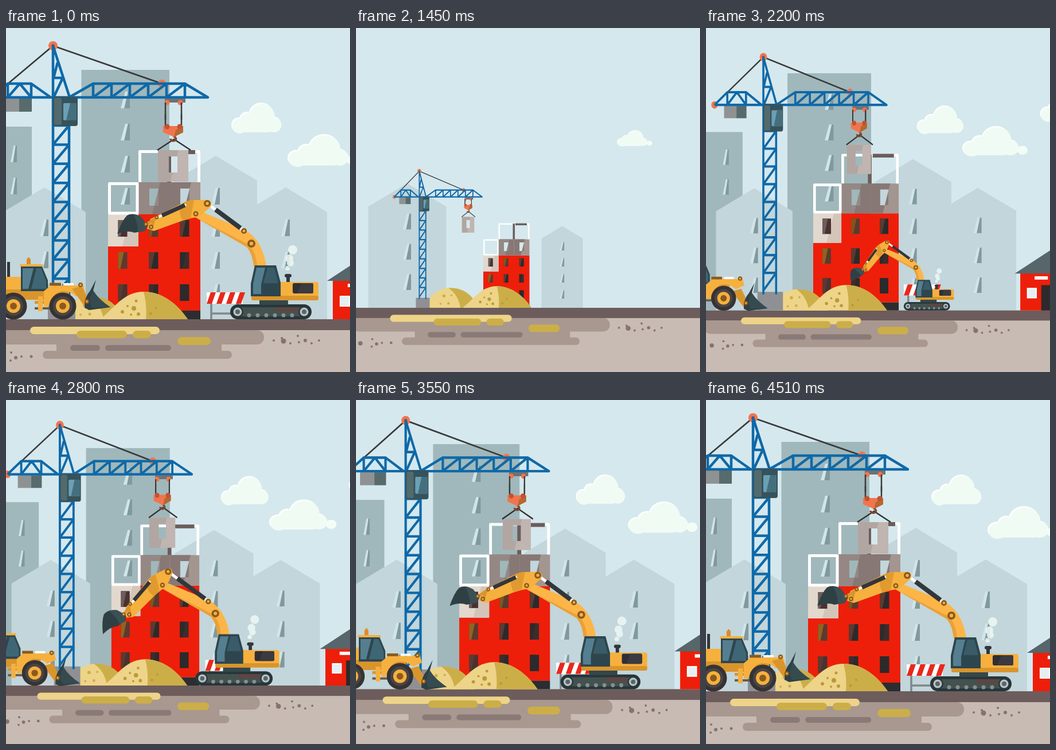
Recreate the animation shown at these times as an HTML page. Size 600 by 600 pixels, loop 4540 ms.

```html
<!DOCTYPE html>
<html lang="en">
<head>
<meta charset="utf-8">
<title>Construction site</title>
<style>
html, body { margin: 0; width: 100%; height: 100%; overflow: hidden; background: #d5e8ee; }
svg { display: block; width: 600px; height: 600px; }
</style>
</head>
<body>
<svg id="stage" viewBox="0 0 600 600"></svg>
<script>
const LOOP = 4540, HOLD = 1000, END = 4510, GROUND = 508;
const INK = '#2e4044', YELLOW = '#f6b03e', AMBER = '#d9952c', BROWN = '#8a5a1e',
  ORANGE = '#f0754f', STEEL = '#0f69a8', RED = '#ed1f0a', SAND = '#edd488', SAND2 = '#ccae49';

// Markup helpers
const rect = (x, y, w, h, fill, r = 0) => `<rect x="${x}" y="${y}" width="${w}" height="${h}" rx="${r}" fill="${fill}"/>`;
const disc = (x, y, r, fill) => `<circle cx="${x}" cy="${y}" r="${r}" fill="${fill}"/>`;
const shape = (d, fill) => `<path d="${d}" fill="${fill}" fill-rule="evenodd"/>`;
const line = (d, color, w) => `<path d="${d}" fill="none" stroke="${color}" stroke-width="${w}" stroke-linejoin="round"/>`;
const group = (id, body) => `<g id="${id}">${body}</g>`;
const pop = (start, x, y, body) => `<g data-pop="${start},${x},${y}">${body}</g>`;
const range = (n, f) => Array.from({ length: n }, (_, i) => f(i)).join('');
const dots = (list, fill) => list.map(([x, y, r]) => disc(x, y, r, fill)).join('');
const joint = (x, y, r) => disc(x, y, r, BROWN) + disc(x, y, r * .45, YELLOW);

// Distant buildings
function pane(x, y, w = 15) {
  return shape(`M${x} ${y + 29}L${x + w * .5} ${y}H${x + w * .8}L${x + w * .4} ${y + 29}Z`, '#d0e4e9') +
    shape(`M${x + w * .8} ${y}H${x + w}V${y + 29}H${x + w * .4}Z`, '#81999d');
}
const panes = (x, y, n, w) => range(n, i => pane(x, y + 56 * i, w));
function gable(start, x, top, n) {
  return pop(start, x, GROUND, shape(`M${x - 72} ${GROUND}V${top + 43}L${x} ${top}L${x + 72} ${top + 43}V${GROUND}Z`, '#c2d6db') +
    panes(x - 8, top + 56, n));
}

// Clouds
function cloud(id, start, x, y, sx, sy, puff) {
  const lobes = (dx, dy, fill) => disc(13 + dx, 39 + dy, 13, fill) + disc(27 + dx, 29 + dy, 13, fill) +
    disc(52 + dx, 22 + dy, 22, fill) + disc(73 + dx, 37 + dy, 13, fill) + rect(13 + dx, 28 + dy, 60, 24 - dy, fill, 10);
  const body = lobes(0, 0, '#fff') + lobes(1.5, 2, '#f0fbf4') + (puff ? disc(93, 43, 8, '#f3fdf6') : '');
  return group(id, pop(start, x + 43 * sx, y + 26 * sy, `<g transform="translate(${x} ${y}) scale(${sx} ${sy})">${body}</g>`));
}

// Red block under construction
function glass(x, y, left, right) {
  return rect(x, y, 16, 29, right) + shape(`M${x} ${y}h10l-6 29h-4Z`, left);
}
function hollow(x, y, left, right) {
  const hole = `M${x + 19} ${y + 11}v30h16v-30Z`;
  return shape(`M${x} ${y}h54v56h-54Z` + hole, right) + shape(`M${x} ${y}h38l-14 56h-24Z` + hole, left);
}
function block() {
  const tones = [['#6b5d5a', '#4a3230'], ['#80561c', '#5b3a30'], ['#5b3a30', '#2c2a2c'],
    ['#8f6420', '#5b3a30'], ['#5b3a30', '#2c2a2c'], ['#2c2a2c', '#3b2d2c'],
    ['#5b3a30', '#4a3230'], ['#3b2d2c', '#2c2a2c'], ['#2c2a2c', '#2c2a2c']];
  return shape('M178 381H231V325H339V493H178Z', RED) + rect(178, 493, 161, 15, '#2b2d30') +
    rect(178, 325, 53, 56, '#e2d8ce') + shape('M217 325h14v56h-28Z', '#d3c5ba') +
    tones.map(([a, b], i) => glass(195.5 + 54 * (i % 3), 335 + 56 * (i / 3 | 0), a, b)).join('') +
    hollow(231, 269, '#958884', '#877875') + hollow(285, 269, '#877875', '#a3958f') +
    line('M180.500 323V271.500H229V323Z', '#fff', 5) +
    line('M233.500 269V215.500H336.500V269', '#fff', 5) +
    rect(281, 214, 7, 55, '#6b5d5a') + rect(290, 213, 40, 7, '#6b5d5a');
}

// Tower crane
function crane() {
  const mast = line(`M82 121V478M110 121V478` + range(9, i => `M82 ${170 + 33.4 * i}H110L82 ${203.4 + 33.4 * i}`), STEEL, 4.500);
  const jib = line('M-25 121H352L312 97H152L110 121M-25 121L3 97H44L78 121M3 97V121L24 97L44 121V97' +
    range(6, i => `M${152 + 32 * i} 97V121` + (i < 5 ? `L${184 + 32 * i} 97` : '')), STEEL, 4.500);
  const head = line('M82 121V31L111 121M83 87H99L84 119M83 87L90 60', STEEL, 4.500);
  const load = shape('M265 213h53v55h-53ZM284 224v28h15v-28Z', '#c0b5b0') +
    shape('M265 213h36l-3 11h-14v28h7l-4 16h-22Z', '#b1a6a2') +
    line('M264 213L293 194L322 213', '#333', 2.500) +
    line('M293 183v6q7 5 0 8q-6 0-6-4', '#7a4630', 3.500) +
    shape('M274 171H309V182L293 190L274 182Z', ORANGE) + shape('M293 190L309 182V171L296 178Z', '#b5682f') +
    disc(281, 172, 4.500, '#c4522f') + disc(303, 172, 4.500, '#c4522f');
  return rect(73, 473, 48, 35, '#8f9094') + group('crane', mast +
    rect(-4, 123, 27, 23, '#8e9293') + rect(23, 123, 22, 23, '#586b6c') +
    line('M-25 121L82 31L272 97', '#3a3a3a', 2.800) +
    disc(82, 31, 8, ORANGE) + disc(82, 31, 3, '#c4522f') + disc(-25, 121, 7, ORANGE) + disc(272, 97, 7, ORANGE) + head + jib +
    rect(82, 120, 43, 51, '#36525a', 4) + rect(84, 122, 13, 47, '#526a6c', 3) +
    rect(100, 131, 23, 30, '#6ba0b5', 2) + shape('M112 131h11v30h-18Z', '#456f7d') +
    rect(277, 123, 36, 7, '#6d7275') + disc(281, 130, 4.500, ORANGE) + disc(304, 130, 4.500, ORANGE) +
    line('M278 130V160M306 130V160', '#3a3a3a', 2.500) +
    group('load', line('M278 150V174M306 150V174', '#3a3a3a', 2.500) + load));
}

// Sand, barrier and shed
const smallPile = shape('M98 508Q114 468 150 468Q188 470 206 508Z', SAND) +
  shape('M146 468Q188 466 206 508H170Q166 482 146 468Z', SAND2) + dots([[137, 484, 3], [146, 499, 2.500], [130, 500, 2], [152, 483, 2]], SAND2);
const bigPile = shape('M164 508C190 488 205 460 240 460C276 460 302 486 317 508Z', SAND) +
  shape('M240 460C276 460 302 486 317 508H244Q246 482 240 460Z', SAND2) +
  dots([[203, 495, 3], [212, 485, 2], [223, 489, 4], [231, 499, 3], [218, 500, 2], [227, 476, 2.500], [252, 498, 2.500], [262, 488, 2]], '#b99a3a');
const barrier = line('M358 480V508M404 480V508M358 498H404', '#7d898c', 3.500) + rect(350, 461, 63, 20, '#fff') +
  range(4, i => shape(`M${350 + 17 * i} 481l7-20h9l-7 20Z`, '#e8281c'));
const shed = rect(570, 438, 108, 70, RED) + shape('M560 441L624 399L688 441Z', '#56666a') +
  rect(596, 446, 24, 6, '#fff') + rect(582, 467, 18, 19, '#fff') + rect(584, 469, 14, 15, '#e6eff2') + rect(608, 462, 24, 46, '#2c2a2c');

// Excavator
function digger() {
  const bucket = shape('M247 345L236 330Q222 321 211 327Q202 336 194 359Q212 352 224 357L242 354Z', INK) +
    shape('M236 330L247 345L242 354L230 356Q230 340 222 325Z', '#3a5054');
  const stick = shape('M352 300L326 300Q315 301 305 307L252 333L246 350L258 354L308 336Q326 330 336 330L357 312Q361 302 352 300Z', YELLOW) +
    shape('M305 307Q315 301 328 300L322 331L308 336Q300 322 305 307Z', '#e09a30') +
    line('M314 308L263 331', '#fff', 4) + line('M312 309L272 327', '#33363a', 7) +
    line('M263 331L244 343M258 336L254 347', AMBER, 5) +
    joint(263, 330, 3.500) + joint(253, 347, 4) + joint(244, 342, 3.500) + joint(351, 306, 6);
  const boom = shape('M330 318L345 322L410 349Q432 358 444 382Q452 398 454 416H432Q430 394 420 382L330 330Z', '#fdb548') +
    shape('M330 330L420 382Q430 394 432 416H438Q436 390 424 378Z', '#e9a139');
  const tracks = rect(391, 482, 142, 26, '#26363a', 13) + rect(397, 487, 130, 16, '#43524f', 8) + rect(470, 487, 40, 7, '#5f4540') +
    [404, 520].map(x => disc(x, 495, 10, '#2a3639') + disc(x, 495, 7.500, '#b9c2c3') + disc(x, 495, 4, '#56666a')).join('') +
    range(6, i => disc(424 + 15 * i, 501, 3.500, '#87908f'));
  const body = rect(442, 474, 50, 9, '#34474b') + rect(428, 443, 117, 32, YELLOW, 4) + rect(428, 467, 117, 8, AMBER, 3) +
    rect(500, 445, 36, 18, '#2f2f35', 3) + shape('M515 445h18q3 0 3 3v12q0 3-3 3h-25Z', '#3b3a40') +
    rect(489, 432, 6, 11, '#33363a') + rect(486, 429, 12, 6, '#33363a', 3) +
    shape('M434 414H471L479 444V468H427V446Z', '#2d464e') + shape('M437 418H452L445 448V464H431V446Z', '#557f90') +
    shape('M456 418H468L475 445H449Z', '#3a5c69');
  const smoke = '<g opacity=".85">' + dots([[500, 387, 8], [494, 402, 7], [496, 410, 6], [491, 419, 4]], '#eef9f5') + '</g>';
  return group('digger', pop(2085, 462, GROUND, smoke + boom + tracks + body +
    `<line id="rod" stroke="#fff" stroke-width="5"/><line id="ram" stroke="#33363a" stroke-width="8"/>` +
    joint(415, 354, 5) + joint(428, 376, 7) + group('stick', bucket + stick) + joint(331, 324, 4.500)));
}

// Wheel loader
function loader() {
  const wheel = x => disc(x, 485, 23.500, '#363334') + disc(x, 485, 17, '#4a4545') + disc(x, 485, 12, YELLOW) + disc(x, 485, 6, BROWN);
  const scoop = shape('M115 455L132 450L145 476L136 484Z', AMBER) +
    shape('M157 439L152 458Q162 474 182 487L145 492L137 488Q136 470 147 458Z', INK) +
    shape('M152 458Q162 474 182 487L150 488Q142 474 152 458Z', '#364b4f') + joint(141, 477, 4);
  return group('loader', pop(1610, 50, GROUND, rect(2, 408, 5, 28, '#33363a') + rect(-40, 434, 72, 34, YELLOW, 5) + rect(-40, 456, 150, 18, AMBER) +
    rect(36, 402, 7, 12, '#e08a26', 2) + rect(38, 400, 3, 4, '#e08a26') +
    rect(24, 412, 41, 5, YELLOW, 2) + shape('M26 416H63L73 440V459H26Z', '#2d464e') +
    shape('M29 419H48L39 455H29Z', '#557f90') + shape('M53 419H61L70 441V455H44Z', '#3f6675') +
    rect(50, 476, 28, 5, AMBER) + rect(50, 487, 28, 4, '#6b5a4a') + rect(56, 468, 8, 26, YELLOW) +
    shape('M66 459L78 449H124L134 446L138 461L122 468Q112 458 97 459Q80 462 74 486H66Z', YELLOW) +
    line('M76 447H96', BROWN, 5) + line('M100 447H118', '#fff', 4) +
    group('scoop', scoop) + joint(130, 448, 4) + wheel(13) + wheel(99)));
}

// Road surface
function road() {
  const taupe = '#a8988f', dark = '#8a7a77';
  return rect(-28, 527, 478, 25, taupe, 12) + rect(-28, 527, 460, 14, taupe) + rect(88, 545, 288, 24, taupe) + rect(64, 563, 330, 14, taupe, 7) +
    rect(112, 553, 52, 10, dark, 5) + rect(173, 553, 115, 10, dark, 5) +
    rect(42, 521, 226, 13, SAND, 6.500) + rect(123, 528, 88, 13, SAND2, 6.500) + rect(221, 528, 32, 13, SAND2, 6.500) + rect(299, 539, 58, 14, SAND2, 7) +
    dots([[467, 545, 2], [484, 546, 4.500], [481, 541, 2], [496, 550, 2], [509, 537, 2], [511, 548, 2], [522, 545, 3], [533, 550, 2], [546, 545, 2],
      [-26, 571, 2], [-13, 574, 4], [9, 566, 2], [17, 575, 3], [8, 580, 2], [27, 573, 2], [44, 573, 2.500]], '#84736f');
}

document.getElementById('stage').innerHTML = rect(0, 0, 600, 600, '#d5e8ee') + group('camera',
  pop(1546, -42, GROUND, rect(-130, 172, 175, 336, '#a0b8bb') + panes(8, 205, 4, 11)) +
  pop(1720, 208, GROUND, rect(131.5, 73, 153.5, 435, '#a0b8bb') + panes(200, 111, 5, 16)) +
  gable(1050, 67, 278, 3) + gable(1350, 366, 223, 4) + gable(1640, 488, 278, 3) +
  cloud('cloudA', 1645, 393, 130, 1, 1) + cloud('cloudB', 1350, 491, 185, 1.22, 1.06, true) + cloud('cloudC', 1760, 630, 114, 1, 1) +
  rect(-60, GROUND, 720, 160, '#c8bbb3') + pop(1030, 300, GROUND, rect(-80, GROUND, 760, 19, '#6d5c5c')) +
  pop(1100, 250, GROUND, road()) +
  pop(1350, 258, GROUND, block()) + pop(1200, 158, GROUND, smallPile) + pop(1350, 97, GROUND, crane()) +
  pop(1250, 240, GROUND, bigPile) +
  pop(1800, 381, GROUND, barrier) + pop(1760, 624, GROUND, shed) + digger() + loader());

const el = Object.fromEntries([...document.querySelectorAll('[id]')].map(e => [e.id, e]));
const pops = [...document.querySelectorAll('[data-pop]')].map(e => [e, ...e.dataset.pop.split(',').map(Number)]);
const set = (e, value) => e.setAttribute('transform', value);
const clamp = v => Math.min(1, Math.max(0, v));
const sine = v => (1 - Math.cos(Math.PI * clamp(v))) / 2;
const backOut = p => p <= 0 ? 0 : 1 + 2.1 * (p - 1) ** 3 + 1.1 * (p - 1) ** 2;
const scaleAt = (x, y, sx, sy = sx) => `translate(${x} ${y}) scale(${sx} ${sy}) translate(${-x} ${-y})`;
function placeLine(e, x1, y1, x2, y2) {
  Object.entries({ x1, y1, x2, y2 }).forEach(([k, v]) => e.setAttribute(k, v));
}

function draw(t) {
  const left = (END - t) / 1000;
  set(el.camera, scaleAt(300, 300, .9 + .1 * sine((t - HOLD) / (END - HOLD))));
  for (const [e, start, x, y] of pops) set(e, scaleAt(x, y, backOut(clamp((t - start) / 600))));

  set(el.cloudA, `translate(${-8.5 * left} ${-3.5 * left})`);
  set(el.cloudB, `translate(${-14 * left} ${-10.5 * left})`);
  set(el.cloudC, `translate(${-10 * left} ${-7 * left})`);
  set(el.crane, scaleAt(97, 0, 1 - .061 * left, 1));
  set(el.load, `translate(0 ${-7.3 * left})`);

  set(el.digger, `translate(${-70 * clamp((END - t) / 2010)})`);
  const angle = -30 * (1 - sine((t - 2500) / 1150)), a = angle * Math.PI / 180;
  set(el.stick, `rotate(${angle} 331 324)`);
  const ax = 331 + 20 * Math.cos(a) + 18 * Math.sin(a), ay = 324 + 20 * Math.sin(a) - 18 * Math.cos(a);
  placeLine(el.rod, 415, 354, ax, ay);
  placeLine(el.ram, 409, 349, ax + (409 - ax) * .25, ay + (349 - ay) * .25);

  set(el.loader, `translate(${-47 * Math.max(0, left - .4)})`);
  set(el.scoop, `translate(0 ${17 * (1 - sine((t - 3700) / 700))})`);
}

function frame() {
  const t = performance.now() % LOOP;
  draw(t < HOLD ? END : Math.min(t, END));
  requestAnimationFrame(frame);
}
frame();
</script>
</body>
</html>
```
